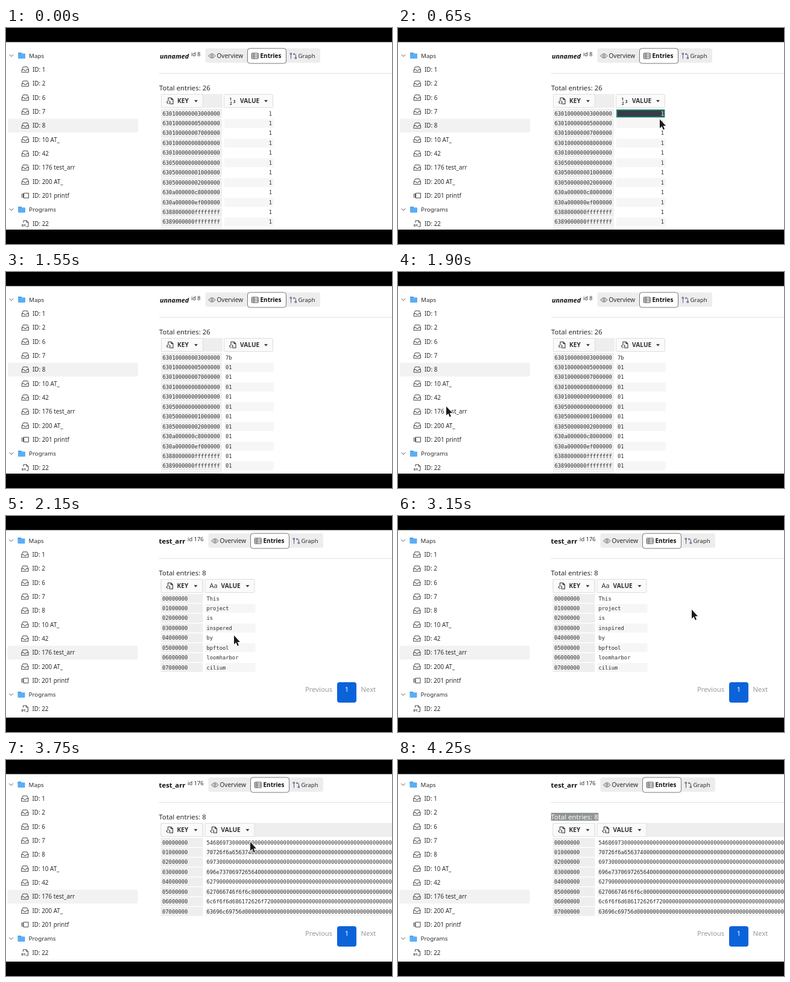
Recreate the animation shown at these times as an HTML page with a canvas. Size 640 by 360 pixels, loop 4300 ms.

```html
<!DOCTYPE html>
<html lang="en">
<head>
<meta charset="utf-8">
<title>Map entries browser</title>
<style>
html, body { margin: 0; width: 100%; height: 100%; overflow: hidden; background: #000; }
canvas { display: block; width: 640px; height: 360px; }
</style>
</head>
<body>
<canvas id="stage" width="640" height="360"></canvas>
<script>
const ctx = document.getElementById('stage').getContext('2d');
const LOOP = 4300, STEP = 50;
const SANS = '"Noto Sans", sans-serif', MONO = '"DejaVu Sans Mono", monospace';
const INK = '#2b2b2b', ROW = 16.44, SIDE_ROW = 23.33;

const words = ['This', 'project', 'is', 'inspired', 'by', 'bpftool', 'loomharbor', 'cilium'];
const longKeys = [
  ...[3, 5, 7, 8, 9].map(n => `63010000000${n}000000`),
  ...[0, 1, 2].map(n => `63050000000${n}000000`),
  '630a000000c8000000', '630a000000ef000000',
  '6388000000ffffffff', '6389000000ffffffff', ''
];
const sidebar = ['Maps', '1', '2', '6', '7', '8', '10 AT_', '42', '176 test_arr',
  '200 AT_', '201 printf', 'Programs', '22'];

// Pointer stops: time, x, y
const path = [
  [50, 8, 155], [400, 434, 152], [1150, 434, 152], [1350, 402, 120], [1400, 402, 120],
  [1550, 340, 340], [1800, 340, 340], [1900, 80, 224], [1950, 80, 224], [2050, 400, 113],
  [2100, 400, 113], [2150, 378, 199], [2250, 374, 187], [2900, 374, 187], [3150, 487, 156],
  [3200, 487, 156], [3400, 401, 115], [3450, 401, 115], [3600, 453, 164], [3950, 331, 94]
];

function text(str, x, y, size, color = INK, weight = '', family = SANS, align = 'left') {
  ctx.font = `${weight} ${size}px ${family}`;
  ctx.textAlign = align;
  ctx.fillStyle = color;
  ctx.fillText(str, x, y);
}

function rect(x, y, w, h, color) {
  ctx.fillStyle = color;
  ctx.fillRect(x, y, w, h);
}

function box(x, y, w, h, r, fill, stroke) {
  ctx.beginPath();
  ctx.roundRect(x, y, w, h, r);
  if (fill) { ctx.fillStyle = fill; ctx.fill(); }
  if (stroke) { ctx.strokeStyle = stroke; ctx.lineWidth = 1; ctx.stroke(); }
}

function line(x, y, d, color = '#444', width = 1) {
  ctx.save();
  ctx.translate(x, y);
  ctx.strokeStyle = color;
  ctx.lineWidth = width;
  ctx.lineJoin = ctx.lineCap = 'round';
  ctx.stroke(new Path2D(d));
  ctx.restore();
}

const icons = {
  chevron: (x, y) => line(x, y, 'M-3-1.5L0 1.5L3-1.5', '#555'),
  folder(x, y) {
    box(x - 6, y - 5, 6, 4, 1, '#3c94e6');
    box(x - 6, y - 3.5, 12, 8.5, 1, '#5aaef5');
  },
  tray: (x, y) => line(x, y, 'M-5.5 0L-3.5-4.5H3.5L5.5 0V4.5H-5.5ZM-5.5 0H-2L-1 2H1L2 0H5.5'),
  stack: (x, y) => line(x, y, 'M-2-4H5.5V4H-2ZM-3.5-3.5V3.5M-5.5-3V3'),
  binary(x, y) {
    line(x, y, 'M-3-2V-5H2L5-2V5H2M2-5V-2H5');
    text('01', x - 6, y + 5, 6, '#333', 'bold');
  },
  code: (x, y) => line(x, y, 'M-3-1V-5H2L5-2V5H0M2-5V-2H5M-3.5 0L-5.5 2.2L-3.5 4.5M-1.5 0L.5 2.2L-1.5 4.5', '#333', 1.1),
  eye: (x, y) => line(x, y, 'M-5.5 0Q0-7.5 5.5 0Q0 7.5-5.5 0M1.7 0A1.7 1.7 0 1 1-1.7 0A1.7 1.7 0 1 1 1.7 0', '#555566'),
  table: (x, y) => line(x, y, 'M-5-4.5H5V4.5H-5ZM-5-1.5H5M-5 1.5H5M-2-4.5V4.5'),
  branch: (x, y) => line(x, y, 'M-4-2V4.5M4 2V-1Q4-3 2-3H0L1.5-4.5M0-3L1.5-1.5M-5-4.5H-3V-2.5H-5ZM3 2.5H5V4.5H3Z', '#555577'),
  number(x, y) {
    text('1', x - 5.5, y - .3, 6.5, '#333', 'bold');
    text('2', x - 5, y + 6, 6.5, '#333', 'bold');
    text('3', x + .8, y + 3, 6.5, '#333', 'bold');
  },
  letters: (x, y) => text('Aa', x - 7, y + 3.5, 11, '#333', '500')
};

function drawSidebar(selected) {
  sidebar.forEach((label, i) => {
    const y = 46 + i * SIDE_ROW;
    if (i === selected) box(3, y - 11.5, 216, 23, 3, '#f2f2f2');
    if (/^[MP]/.test(label)) {
      icons.chevron(9, y);
      icons.folder(26, y);
      text(label, 38, y + 3.6, 9.8);
    } else {
      const icon = i === 10 ? 'stack' : i === 12 ? 'binary' : 'tray';
      icons[icon](32, y);
      text('ID: ' + label, 44, y + 3.6, 9.85);
    }
  });
}

function drawTabs(x) {
  box(x, 34, 190.5, 24, 4, '#ededee');
  box(x + 70, 34, 64, 25, 4, '#fff', '#777');
  icons.eye(x + 11, 46.5);
  text('Overview', x + 19, 50.3, 10);
  icons.table(x + 82.5, 46.5);
  text('Entries', x + 91, 50.3, 10, '#111', 'bold');
  icons.branch(x + 146, 46.5);
  text('Graph', x + 154, 50.3, 9.7);
}

function headerButton(x, w, label, icon) {
  box(x + .5, 110.5, w - 1, 22, 2, '#fafafa', '#dddddd');
  icons[icon](x + 15, 121.5);
  text(label, x + 27, 125.2, 10.2, '#333', '600');
  ctx.fillStyle = '#333';
  ctx.fill(new Path2D(`M${x + w - 15} 120.3h6l-3 3.5z`));
}

function drawTable({ keys, values, keyWidth, valueWidth, kind, edit }) {
  const valueX = 257 + keyWidth + 3;
  const right = kind === 'number';
  const wide = kind === 'code' && values[0].length > 9;
  rect(257, 110, keyWidth + 1, 23, '#eeeeee');
  if (wide) rect(valueX, 110, 640, 23, '#eeeeee');
  headerButton(257, 70, 'KEY', 'code');
  headerButton(valueX, valueWidth, 'VALUE', kind);
  keys.forEach((key, i) => {
    const y = 142.4 + i * ROW;
    rect(257, y - 7.5, keyWidth, 15, '#eeeeee');
    if (i % 2) rect(valueX + 1, y - 7.5, wide ? 640 : valueWidth, 15, '#f6f6f6');
    text(key, 259.5, y + 3.2, 8.8, INK, '', MONO);
    let color = INK;
    if (edit && edit.row === i) {
      rect(valueX + 1, y - 6.7, valueWidth - 1.5, 13.5, '#238768');
      rect(valueX + 3, y - 4.9, valueWidth - 5.5, 9.9, edit.all ? '#373c4b' : '#fff');
      if (edit.all) color = '#fff';
    }
    text(values[i], right ? 441 : valueX + 3, y + 3.2, 8.8, color, '', MONO, right ? 'right' : 'left');
  });
}

function drawNumbers(t) {
  drawSidebar(5);
  text('unnamed', 255, 50.5, 10.8, '#111', 'italic bold');
  text('id 8', 307, 46.5, 9);
  drawTabs(330.5);
  rect(254, 75, 386, 1, '#e3e3e3');
  text('Total entries: 26', 254, 104, 11.35);
  const hex = t >= 1400;
  const typed = t < 800 ? '1' : t < 900 ? '12' : '123';
  const rest = hex ? '01' : '1';
  drawTable({
    keys: longKeys,
    values: longKeys.map((key, i) => !key ? '' : i ? rest : hex ? '7b' : typed),
    keyWidth: 101, valueWidth: 82, kind: hex ? 'code' : 'number',
    edit: t >= 650 && t < 1100 ? { row: 0, all: t < 750 } : null
  });
}

const toHex = word => [...word].map(c => c.charCodeAt(0).toString(16)).join('').padEnd(72, '0');

function drawWords(t) {
  ctx.translate(-.5, -5);
  drawSidebar(8);
  text('test_arr', 254, 50.5, 11.35, '#111', 'bold');
  text('id 176', 301.5, 46.5, 9.4);
  drawTabs(336);
  rect(254, 75, 387, 1, '#e3e3e3');
  const selected = 79 * Math.min(1, Math.max(0, (t - 3950) / 200));
  text('Total entries: 8', 254, 104, 11.35);
  if (selected) {
    ctx.save();
    ctx.beginPath();
    ctx.rect(254, 93, selected, 13.5);
    ctx.clip();
    rect(254, 93, 79, 13.5, '#8f9691');
    text('Total entries: 8', 254, 104, 11.35, '#fff');
    ctx.restore();
  }
  const hex = t < 2100 || t >= 3450;
  const current = words.map((w, i) => i === 3 && t < 2500 ? 'inspered' : w);
  drawTable({
    keys: words.map((_, i) => `0${i}000000`),
    values: hex ? current.map(toHex) : current,
    keyWidth: 70, valueWidth: 83, kind: hex ? 'code' : 'letters',
    edit: t >= 2350 && t < 2700 ? { row: 3, all: t < 2400 } : null
  });
  text('Previous', 496.5, 298, 11.25, '#999');
  box(549.5, 282, 32, 34, 4, '#0b63d9');
  text('1', 565.5, 298, 11.25, '#fff', '', SANS, 'center');
  text('Next', 589, 298, 11.25, '#999');
}

function drawPointer(t) {
  const i = path.findIndex(stop => stop[0] > t);
  if (i < 1) return;
  const [t0, x0, y0] = path[i - 1], [t1, x1, y1] = path[i];
  const p = (t - t0) / (t1 - t0), k = p * p * (3 - 2 * p);
  ctx.save();
  ctx.translate(x0 + (x1 - x0) * k, y0 + (y1 - y0) * k);
  const arrow = new Path2D('M0 0V15L3.4 11.8L5.8 17.5L8 16.5L5.6 11H10Z');
  ctx.strokeStyle = '#fff';
  ctx.lineWidth = 1.6;
  ctx.stroke(arrow);
  ctx.fillStyle = '#1a1a1a';
  ctx.fill(arrow);
  ctx.restore();
}

function frame(now) {
  const t = Math.floor((now % LOOP) / STEP) * STEP;
  rect(0, 0, 640, 360, '#fff');
  ctx.save();
  (t < 1950 ? drawNumbers : drawWords)(t);
  ctx.restore();
  drawPointer(t);
  rect(0, 0, 640, 23.5, '#000');
  rect(0, 336, 640, 24, '#000');
  requestAnimationFrame(frame);
}
requestAnimationFrame(frame);
</script>
</body>
</html>
```
